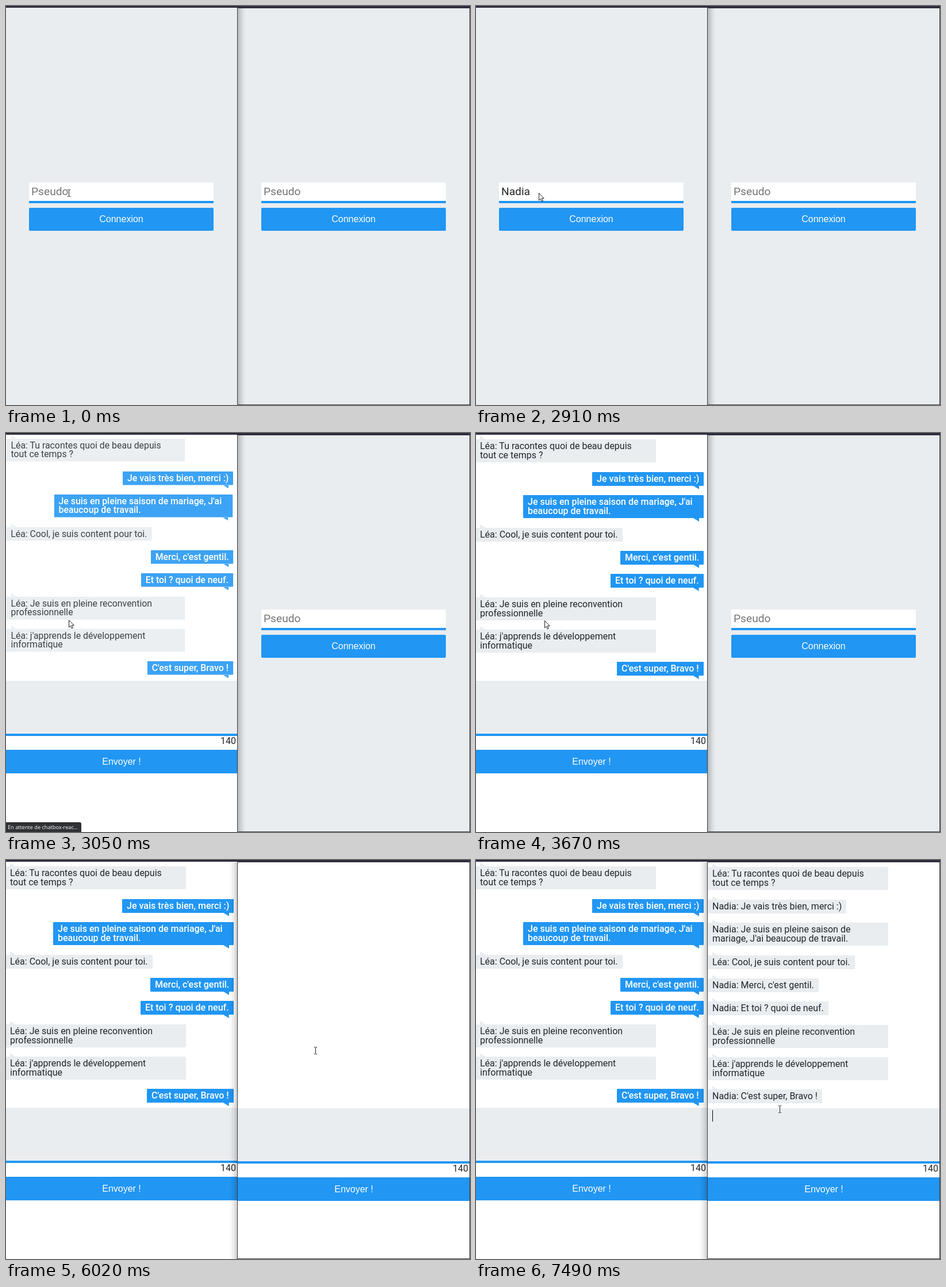
These frames come from a looping animation (807 by 694 pixels, 8000 ms). An HTML page:

```html
<!DOCTYPE html>
<html lang="fr">
<head>
<meta charset="utf-8">
<title>Chatbox</title>
<style>
:root { --blue: #2196f3; --grey: #e9edf0; --loop: 8s infinite; }
html, body { margin: 0; width: 100%; height: 100%; overflow: hidden; background: #fff; }
#stage { position: relative; width: 807px; height: 694px; overflow: hidden; font: 16px/16px Roboto, sans-serif; color: #212529; }
#stage * { box-sizing: border-box; }
#stage div, #stage svg { position: absolute; white-space: nowrap; }

.pane { top: 0; width: 404px; height: 694px; overflow: hidden; background: #fff; }
.left { left: -1px; --dy: 0px; }
.right { left: 403px; --dy: 1px; }
.login, .chat { inset: 0; }
.login { background: var(--grey); }
.left .login { animation: login-l var(--loop) step-end; }
.right .login { animation: login-r var(--loop) step-end; }
.chat { top: var(--dy); }

.field { left: 41px; top: 307px; width: 321px; height: 36px; background: #fff; border-bottom: 4px solid var(--blue); font-size: 19.2px; line-height: 32px; }
.hint { left: 4px; color: #757575; }
.left .hint { animation: hint-l var(--loop) step-end; }
.right .hint { animation: hint-r var(--loop) step-end; }
#stage .typed { left: 4px; top: 4px; height: 24px; line-height: 24px; box-sizing: content-box; overflow: hidden; border-right: 1px solid #000; }
.left .typed { animation: type-l var(--loop) step-end; }
.right .typed { animation: type-r var(--loop) step-end; }
.button { height: 40px; background: var(--blue); color: #fff; text-align: center; font: 16px/39px "Liberation Sans", Arial, sans-serif; }
.login .button { left: 41px; top: 351px; width: 321px; border-radius: 2px; }
.chat .button { left: 0; top: 551px; width: 404px; height: 41px; line-height: 41px; }
.area { left: 0; top: 431px; width: 404px; height: 96px; background: var(--grey); border-bottom: 4px solid var(--blue); }
.count { right: 3px; top: 527px; line-height: 17px; }
.caret { left: 8px; top: 434px; width: 1px; height: 20px; background: #000; animation: caret var(--loop) step-end; }

.msg { left: 0; padding: 4px 8px; background: var(--grey); border-radius: 1px; }
.msg.wide { width: 314px; }
.msg.mine { left: auto; right: 7px; background: var(--blue); color: #fff; font-weight: 500; }
.msg::before { content: ""; position: absolute; left: 8px; top: -6px; width: 10px; height: 6px; background: inherit; clip-path: polygon(0 0, 100% 100%, 0 100%); }
.msg.mine::before { left: auto; right: 8px; top: 100%; clip-path: polygon(0 0, 100% 0, 100% 100%); }
.left .msg { animation: enter-l var(--loop) ease; }
.right .msg { animation: enter-r var(--loop) ease; }

.status { left: 1px; bottom: 0; width: 131px; height: 17px; padding-left: 3px; background: #303134; color: #fff; border-radius: 0 3px 0 0; font: 9.2px/17px "Open Sans", sans-serif; animation: status var(--loop) linear; }
.bar { top: 0; background: #2f2d40; }
.edge { background: #3e3e46; }
.shade { top: 4px; height: 690px; width: 14px; }
.shade.a { left: 403px; background: linear-gradient(90deg, #0000003a, #0000001c 40%, #00000008 75%, #0000); animation: shade-a var(--loop) step-end; }
.shade.b { left: 388px; background: linear-gradient(270deg, #00000030, #00000016 40%, #00000006 75%, #0000); animation: shade-b var(--loop) step-end; }

.pointer { left: 0; top: 0; animation: move var(--loop) ease-in-out; }
.pointer svg { left: 0; top: 0; width: 1px; height: 1px; overflow: visible; }
.beam { animation: beam var(--loop) step-end; }
.arrow { animation: arrow var(--loop) step-end; }

@keyframes login-l { 0% { visibility: visible } 36.625%, 100% { visibility: hidden } }
@keyframes login-r { 0% { visibility: visible } 74.875%, 100% { visibility: hidden } }
@keyframes hint-l { 0% { opacity: 1 } 19.875%, 100% { opacity: 0 } }
@keyframes hint-r { 0% { opacity: 1 } 64%, 100% { opacity: 0 } }
@keyframes type-l {
  0% { width: 0; border-color: transparent }
  1.875% { width: 0; border-color: #000 }
  8.625% { width: 0; border-color: transparent }
  15.125% { width: 0; border-color: #000 }
  19.875% { width: 14px; border-color: #000 }
  23.625% { width: 24px; border-color: #000 }
  26.25% { width: 35px; border-color: #000 }
  27.75% { width: 40px; border-color: #000 }
  29.625% { width: 51px; border-color: #000 }
  36.375%, 100% { width: 51px; border-color: transparent }
}
@keyframes type-r {
  0% { width: 0; border-color: transparent }
  53.125% { width: 0; border-color: #000 }
  59.625% { width: 0; border-color: transparent }
  64% { width: 6px; border-color: #000 }
  65.125% { width: 17px; border-color: #000 }
  66.25% { width: 26px; border-color: #000 }
  67.375% { width: 33px; border-color: #000 }
  74.5%, 100% { width: 33px; border-color: transparent }
}
@keyframes enter-l {
  0%, 36.6875% { opacity: 0; transform: translateY(-11px) scale(.92) }
  39.1875%, 100% { opacity: 1; transform: none }
}
@keyframes enter-r {
  0%, 75.9% { opacity: 0; transform: translateY(-11px) scale(.92) }
  78.4%, 100% { opacity: 1; transform: none }
}
@keyframes status { 0%, 36.625% { opacity: 0 } 37.75%, 40.625% { opacity: 1 } 43.25%, 100% { opacity: 0 } }
@keyframes shade-a { 0% { opacity: 1 } 52.5%, 100% { opacity: 0 } }
@keyframes shade-b { 0% { opacity: 0 } 52.5%, 100% { opacity: 1 } }
@keyframes caret { 0% { opacity: 0 } 93.625%, 100% { opacity: 1 } }
@keyframes move {
  0%, 42.5% { transform: translate(109px, 325px) }
  43.25%, 45.875% { transform: translate(119px, 326px) }
  53.125%, 87.875% { transform: translate(538px, 331px) }
  93.625%, 100% { transform: translate(528px, 433px) }
}
@keyframes beam {
  0% { opacity: 1 } 36.375% { opacity: 0 } 50.625% { opacity: 1 }
  77.875% { opacity: 0 } 93.1875%, 100% { opacity: 1 }
}
@keyframes arrow {
  0% { opacity: 0 } 36.375% { opacity: 1 } 50.625% { opacity: 0 }
  77.875% { opacity: 1 } 93.1875%, 100% { opacity: 0 }
}
</style>
</head>
<body>
<div id="stage">
  <div class="pane left"></div>
  <div class="pane right"></div>
  <div class="shade a"></div>
  <div class="shade b"></div>
  <div class="edge" style="left:402px;top:3px;width:1px;height:691px"></div>
  <div class="edge" style="left:806px;top:3px;width:1px;height:691px"></div>
  <div class="edge" style="left:403px;top:693px;width:404px;height:1px"></div>
  <div class="bar" style="left:0;width:403px;height:3px"></div>
  <div class="bar" style="left:403px;width:404px;height:4px"></div>
  <div class="pointer">
    <svg class="beam"><path d="M-2 -5.5H0M1 -5.5H3M.5 -5V6M-2 6.5H0M1 6.5H3" fill="none" stroke="#222"/></svg>
    <svg class="arrow"><path d="M.5 .5V13L3.4 10.3 5.3 15 7.4 14.1 5.4 9.6H9.2Z" fill="#fff" stroke="#222"/></svg>
  </div>
</div>
<script>
const me = "Nadia", friend = "Léa";
// [author, text, text when shown with the author's name]; "|" breaks a line
const talk = [
  [friend, "Tu racontes quoi de beau depuis|tout ce temps ?"],
  [me, "Je vais très bien, merci :)"],
  [me, "Je suis en pleine saison de mariage, J'ai|beaucoup de travail.", "Je suis en pleine saison de|mariage, J'ai beaucoup de travail."],
  [friend, "Cool, je suis content pour toi."],
  [me, "Merci, c'est gentil."],
  [me, "Et toi ? quoi de neuf."],
  [friend, "Je suis en pleine reconvention|professionnelle"],
  [friend, "j'apprends le développement|informatique"],
  [me, "C'est super, Bravo !"]
];

function bubbles(user) {
  let top = 11.49;
  return talk.map(([who, text, named = text]) => {
    const mine = who === user;
    const lines = (mine ? text : `${who}: ${named}`).split("|");
    const kind = (mine ? " mine" : "") + (lines.length > 1 ? " wide" : "");
    const html = `<div class="msg${kind}" style="top:${Math.round(top)}px">${lines.join("<br>")}</div>`;
    top += lines.length * 16 + 24.35;
    return html;
  }).join("");
}

function fill(side, user, extra) {
  document.querySelector(".pane." + side).innerHTML = `
    <div class="chat">${bubbles(user)}
      <div class="area"></div><div class="count">140</div>
      <div class="button">Envoyer !</div>${side === "right" ? extra : ""}
    </div>${side === "left" ? extra : ""}
    <div class="login">
      <div class="field"><div class="hint">Pseudo</div><div class="typed">${user}</div></div>
      <div class="button">Connexion</div>
    </div>`;
}

fill("left", me, '<div class="status">En attente de chatbox-reac...</div>');
fill("right", "test", '<div class="caret"></div>');
</script>
</body>
</html>
```
